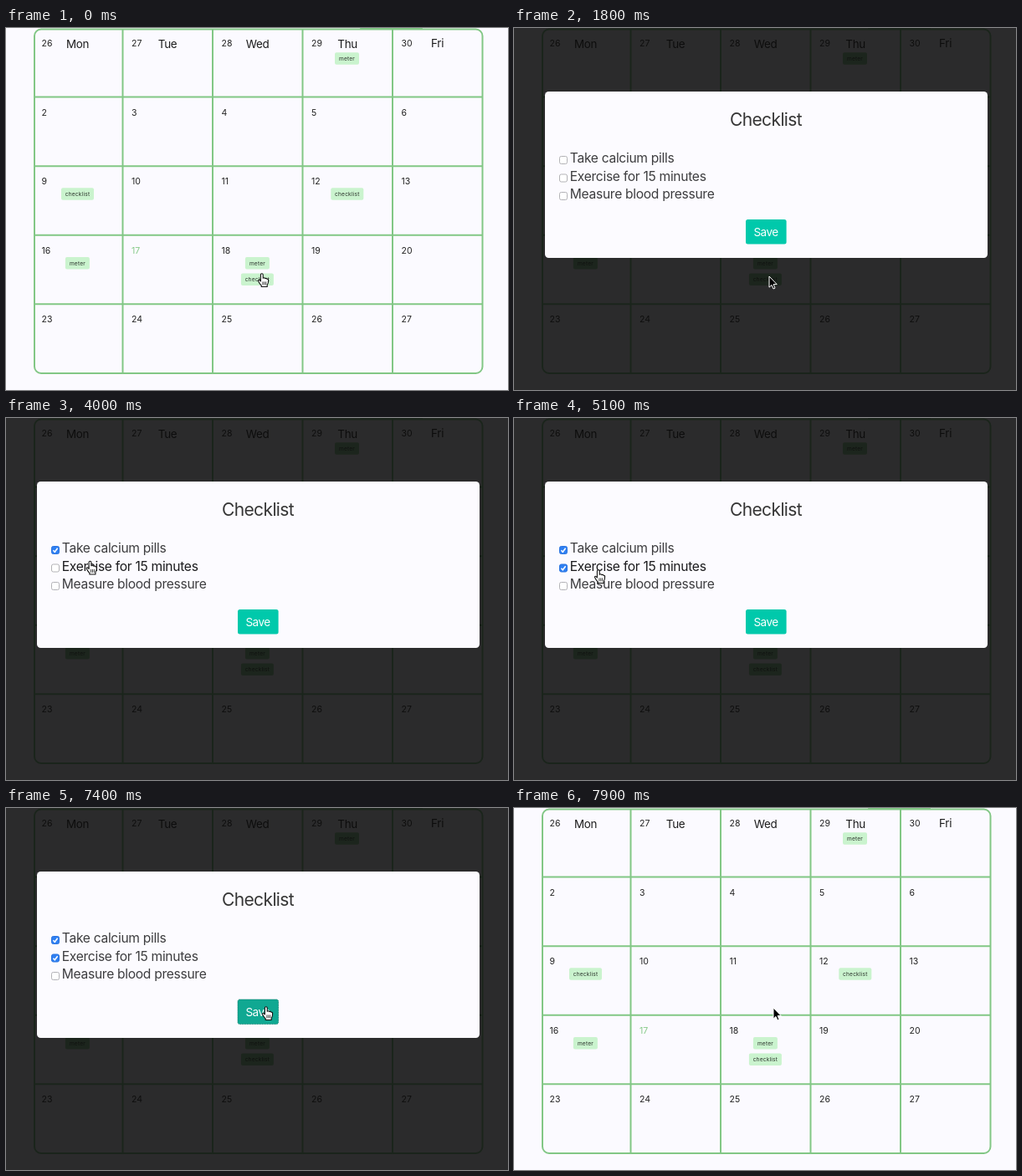
Write an HTML page that moves like this. It is 600 px wide and 433 px high and loops after 8000 ms.

```html
<!DOCTYPE html>
<html lang="en">
<head>
<meta charset="utf-8">
<title>Health calendar</title>
<style>
  html, body { margin: 0; width: 100%; height: 100%; overflow: hidden; background: #fbfaff; }
  svg { display: block; font-family: Inter, "Liberation Sans", sans-serif; }
  .grid { fill: none; stroke: #82c785; stroke-width: 2; }
  .date { font-size: 10.5px; fill: #232323; }
  .today { fill: #85c988; }
  .day { font-size: 13.4px; letter-spacing: -.3px; fill: #1c1c1c; text-anchor: middle; }
  .chip { fill: #caf3ce; }
  .dim .chip { fill: #8fcf93; }
  .tag { font-size: 6.6px; letter-spacing: .2px; fill: #2b332c; text-anchor: middle; }
  .title { font-size: 21px; letter-spacing: -.62px; fill: #363636; text-anchor: middle; }
  .label { font-size: 15.6px; letter-spacing: -.3px; fill: #3d3d3f; }
  .label.hover { fill: #1b1b1d; }
  .box { fill: #fff; stroke: #b3b3b6; }
  .pressed .box { fill: #d9d9dc; stroke: #909094; }
  .checked .box { fill: #2f80f2; stroke: #2b74e0; }
  .tick { fill: none; stroke: #fff; stroke-width: 1.5; visibility: hidden; }
  .checked .tick { visibility: inherit; }
  .face { fill: #00c9ab; }
  .hover .face { fill: #00bfa2; }
  .pressed .face { fill: #10a892; stroke: #087a69; stroke-dasharray: 1 1; }
  .save { font-size: 13.5px; letter-spacing: -.5px; fill: #fff; text-anchor: middle; }
</style>
</head>
<body>
<svg width="600" height="433" viewBox="0 0 600 433">
  <rect width="600" height="433" fill="#fbfaff"/>
  <g id="calendar">
    <rect x="423" y="-6" width="75" height="8" rx="2" fill="#82c785"/>
    <rect class="grid" x="34" y="1.5" width="535.5" height="411.5" rx="8"/>
    <path class="grid" d="M139.5 1.5V413M247 1.5V413M354.5 1.5V413M462 1.5V413M34 82.5H569.5M34 165.3H569.5M34 247.8H569.5M34 330.3H569.5"/>
  </g>
  <g id="modal">
    <rect width="600" height="433" fill="#0a0a0a" fill-opacity=".86"/>
    <rect x="37" y="76" width="529" height="199" rx="4.5" fill="#fcfbff"/>
    <text class="title" x="301" y="117">Checklist</text>
    <g id="button">
      <rect class="face" x="277" y="229" width="48.6" height="29.6" rx="2.5"/>
      <text class="save" x="301" y="249">Save</text>
    </g>
  </g>
  <g id="cursor" stroke-linejoin="round">
    <path id="arrow" d="M0 0V13.2L3 10.4L5 15L7 14.1L5.1 9.6H9.2Z" fill="#000" stroke="#fff"/>
    <g id="hand" stroke="#111" stroke-width="1.1" stroke-linecap="round">
      <path fill="#fff" d="M-1.6 9V1.2A1.4 1.4 0 0 1 1.2 1.2V5.2Q2.6 4.2 3.8 5.6Q5.2 4.9 6 6.2Q7.6 6 7.6 7.8Q7.8 11 6.2 13.2V15.5H-.8V14Q-2.6 12.4 -3.9 9.8Q-5 8 -4.2 7.4Q-3.2 6.8 -1.6 9Z"/>
      <path fill="none" stroke-width=".8" d="M.9 9.8V13M2.8 9.8V13M4.7 9.8V13"/>
    </g>
  </g>
</svg>
<script>
const LOOP = 8000, STEP = 100, OPEN = 1800, CLOSE = 7500, PRESS = 7300;
const $ = id => document.getElementById(id);

function add(parent, tag, attrs, text) {
  const node = document.createElementNS('http://www.w3.org/2000/svg', tag);
  for (const key in attrs) node.setAttribute(key, attrs[key]);
  if (text !== undefined) node.textContent = text;
  return parent.appendChild(node);
}

// Calendar dates and weekday names
const calendar = $('calendar');
const colX = col => 42.5 + col * 107.5;
[26, 2, 9, 16, 23].forEach((first, row) => {
  for (let col = 0; col < 5; col++) {
    const date = first + col;
    add(calendar, 'text', {
      class: date === 17 ? 'date today' : 'date',
      x: colX(col), y: 22 + row * 82.6
    }, date);
  }
});
['Mon', 'Tue', 'Wed', 'Thu', 'Fri'].forEach((name, col) =>
  add(calendar, 'text', { class: 'day', x: 85.6 + col * 107.5, y: col === 4 ? 23.3 : 24.3 }, name));

function chip(x, y, name) {
  const w = name === 'meter' ? 29 : 39;
  add(calendar, 'rect', { class: 'chip', x: x - w / 2, y: y - 7.2, width: w, height: 14.4, rx: 2 });
  add(calendar, 'text', { class: 'tag', x, y: y + 2.3 }, name);
}
chip(407.5, 36.5, 'meter');
chip(85.5, 198.5, 'checklist');
chip(407.8, 198.5, 'checklist');
chip(85.4, 281.2, 'meter');
chip(300.4, 281.2, 'meter');
chip(300.4, 300.8, 'checklist');

// Checklist rows: press and check times, and the right edge of the label
const rows = [
  { text: 'Take calcium pills', right: 191, press: 3400, check: 3600 },
  { text: 'Exercise for 15 minutes', right: 232, press: 4700, check: 4900 },
  { text: 'Measure blood pressure', right: 239, press: LOOP, check: LOOP }
];
rows.forEach((row, i) => {
  const y = 153 + i * 21.5;
  row.top = y - 8;
  row.group = add($('modal'), 'g', {});
  add(row.group, 'rect', { class: 'box', x: 54.5, y: y + .5, width: 9, height: 9, rx: 2 });
  add(row.group, 'path', { class: 'tick', d: 'M2.4 5.2L4.3 7.3L7.6 2.7', transform: `translate(54 ${y})` });
  row.label = add($('modal'), 'text', { class: 'label', x: 66.8, y: y + 8.3 }, row.text);
});

// Cursor path: time, x, y
const path = [
  [0, 306, 294], [900, 304, 298], [1700, 304, 298], [1800, 305, 297], [2400, 305, 297],
  [3300, 102, 154], [3700, 102, 154], [4200, 100, 181], [4300, 100, 181], [4500, 101, 182],
  [5200, 101, 182], [6100, 313, 241], [6500, 311, 238], [7400, 311, 238],
  [7500, 310, 239], [LOOP, 310, 239]
];

function cursorAt(t) {
  const i = path.findIndex(key => key[0] > t);
  const [t0, x0, y0] = path[i - 1], [t1, x1, y1] = path[i];
  const p = (t - t0) / (t1 - t0), k = p * p * (3 - 2 * p);
  return [x0 + (x1 - x0) * k, y0 + (y1 - y0) * k];
}

const show = (node, on) => node.setAttribute('visibility', on ? 'inherit' : 'hidden');

function draw(t) {
  const [x, y] = cursorAt(t);
  const over = (l, top, r, bottom) => x >= l && x < r && y >= top && y < bottom;
  const open = t >= OPEN && t < CLOSE;
  const onButton = open && over(277, 229, 326, 259);
  let link = open ? onButton : over(281, 293, 320, 308);

  for (const row of rows) {
    const hover = open && over(53, row.top, row.right, row.top + 21.5);
    link = link || hover;
    row.label.classList.toggle('hover', hover);
    row.group.classList.toggle('checked', t >= row.check);
    row.group.classList.toggle('pressed', t >= row.press && t < row.check);
  }
  $('button').classList.toggle('hover', onButton);
  $('button').classList.toggle('pressed', t >= PRESS);
  calendar.classList.toggle('dim', open);
  show($('modal'), open);
  show($('hand'), link);
  show($('arrow'), !link);
  $('cursor').setAttribute('transform', `translate(${x} ${y})`);
}

const start = performance.now();
function tick() {
  const t = (performance.now() - start) % LOOP;
  draw(Math.floor(t / STEP) * STEP);
  requestAnimationFrame(tick);
}
tick();
</script>
</body>
</html>
```
